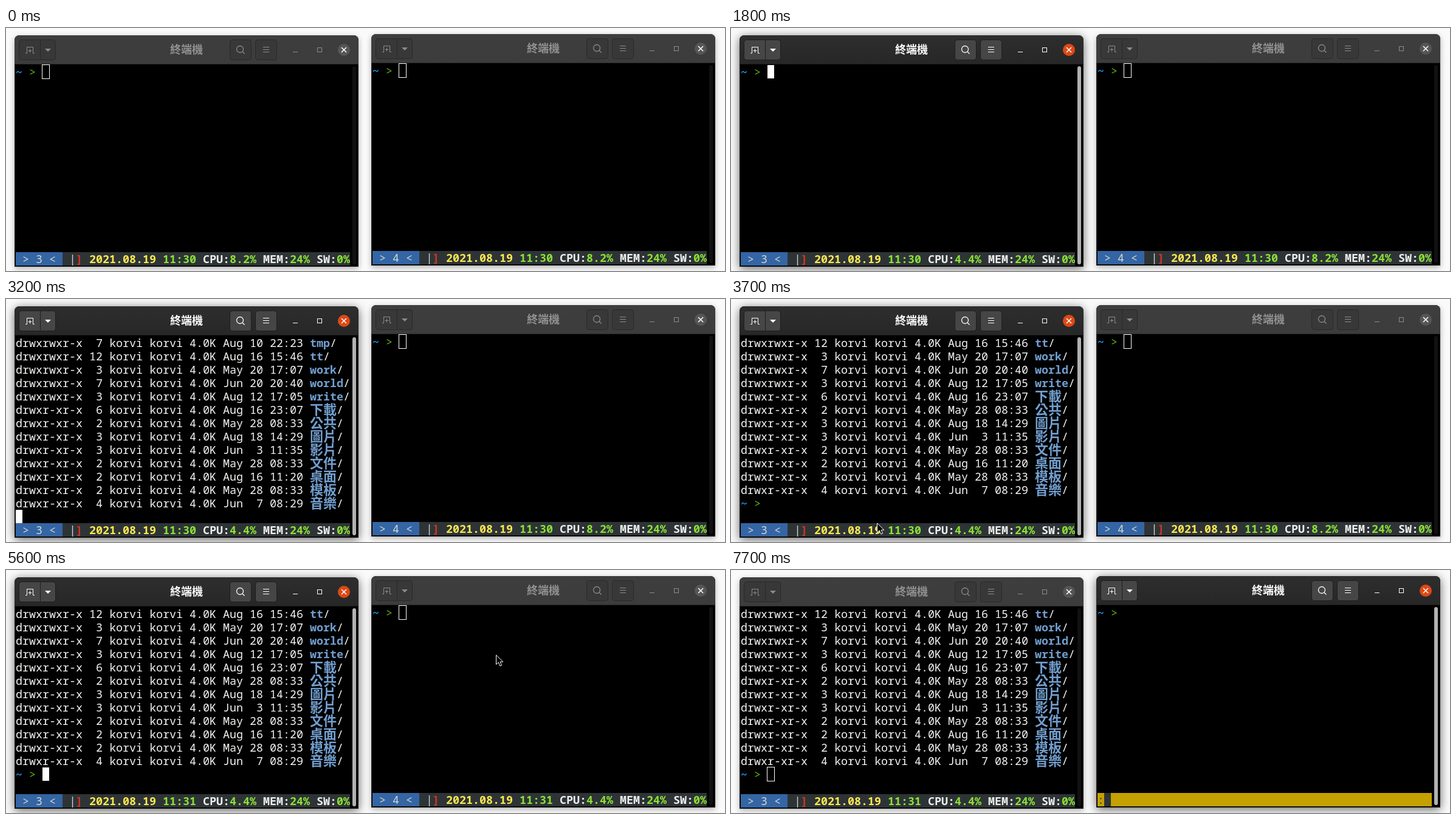
Animation of 1183x400 px, one loop 8000 ms. Source, as an HTML page with a canvas:

```html
<!DOCTYPE html>
<html lang="zh-Hant">
<head>
<meta charset="utf-8">
<title>Terminals</title>
<style>
html, body { margin: 0; width: 100%; height: 100%; overflow: hidden; background: #fafafa; }
canvas { display: block; }
</style>
</head>
<body>
<canvas id="stage" width="1183" height="400"></canvas>
<script>
const ctx = document.getElementById('stage').getContext('2d');
const LOOP = 8000, TICK = 100;
const CW = 11, CH = 22;
const MONO = '18.333px "Noto Sans Mono", "DejaVu Sans Mono", monospace';
const CJK = '"Noto Sans CJK TC", "Noto Sans CJK", "Noto Sans CJK JP", sans-serif';
const C = {
  text: '#f4f4f2', dir: '#729fcf', tilde: '#1e9ff2', arrow: '#5cb811',
  bar: '#2e3436', tab: '#3465a4', soft: '#d3d7cf', red: '#e2321f',
  yellow: '#fce94f', green: '#8ae234', white: '#eeeeec', prompt: '#c4a000'
};

// group bits, links, date, name
const entry = s => {
  const [g, n, date, name] = s.split('|');
  return [`drwx${g}r-x ${n.padStart(2)} korvi korvi 4.0K ${date} `, name];
};
const first = [
  'rwx|2|May 28 09:12|bin', 'rwx|5|Jun 14 10:41|doc', 'rwx|3|Jul  2 16:20|etc',
  'rwx|9|Aug 11 21:03|git', 'rwx|4|Jun 30 13:55|img', 'rwx|6|Jul 19 18:27|lib',
  'rwx|2|May 31 11:08|log', 'rwx|3|Aug  4 20:36|opt', 'rwx|8|Aug  9 22:14|src'
].map(entry);
const last = [
  'rwx|7|Aug 10 22:23|tmp', 'rwx|12|Aug 16 15:46|tt', 'rwx|3|May 20 17:07|work',
  'rwx|7|Jun 20 20:40|world', 'rwx|3|Aug 12 17:05|write', 'r-x|6|Aug 16 23:07|下載',
  'r-x|2|May 28 08:33|公共', 'r-x|3|Aug 18 14:29|圖片', 'r-x|3|Jun  3 11:35|影片',
  'r-x|2|May 28 08:33|文件', 'r-x|2|Aug 16 11:20|桌面', 'r-x|2|May 28 08:33|模板',
  'r-x|4|Jun  7 08:29|音樂'
].map(entry);

// pointer steps: time, x, y (no x = hidden)
const pointerSteps = [
  [0], [400, 520, 330], [500, 420, 280], [600, 321, 249], [1500, 221, 252],
  [1700, 262, 370], [1800],
  [3600, 301, 201], [3700, 240, 368], [3800, 180, 245], [4000, 140, 290],
  [4100, 100, 330], [4200, 60, 360], [4300, 30, 374], [4400, 18, 376],
  [4500, 8, 377], [4700, 40, 372], [4800, 80, 370], [4900, 112, 372],
  [5100, 80, 362], [5200, 23, 370], [5300, 50, 378],
  [5500, 480, 250], [5600, 806, 139], [5700, 806, 138], [7100]
];

const within = (t, a, b) => t >= a && t < b;
const lerp = (a, b, f) => a + (b - a) * f;
const rgb = (a, b, f) => `rgb(${a.map((v, i) => Math.round(lerp(v, b[i], f)))})`;
const gray = (a, b, f) => rgb([a, a, a], [b, b, b], f);
const rise = (t, start) => t < start ? 0 : [0.4, 0.8, 1][Math.min(2, (t - start) / TICK)];

function box(x, y, w, h, fill) {
  ctx.fillStyle = fill;
  ctx.fillRect(x, y, w, h);
}

function round(x, y, w, h, r, fill, stroke) {
  ctx.beginPath();
  ctx.roundRect(x, y, w, h, r);
  if (fill) { ctx.fillStyle = fill; ctx.fill(); }
  if (stroke) { ctx.strokeStyle = stroke; ctx.stroke(); }
}

function line(...pts) {
  ctx.beginPath();
  for (let i = 0; i < pts.length; i += 2) ctx.lineTo(pts[i], pts[i + 1]);
  ctx.stroke();
}

// Writes on the character grid and returns the next column.
function write(col, row, str, color, bold) {
  ctx.fillStyle = color;
  ctx.textAlign = 'left';
  for (const ch of str) {
    const wide = ch > '\u2e80';
    ctx.font = (bold ? 'bold ' : '') + (wide ? '22px ' + CJK : MONO);
    if (ch !== ' ') ctx.fillText(ch, 16 + col * CW, 61 + row * CH + (wide ? 19 : 18));
    col += wide ? 2 : 1;
  }
  return col;
}

function prompt(row, cmd = '') {
  write(0, row, '~', C.tilde, true);
  write(2, row, '>', C.arrow);
  write(4, row, cmd, C.text);
}

function list(rows, top) {
  rows.forEach(([info, name], i) => {
    write(0, top + i, info, C.text);
    write(write(44, top + i, name, C.dir, true), top + i, '/', C.text);
  });
}

function cursor(col, row, focused, lit) {
  const x = 16 + col * CW, y = 61 + row * CH;
  if (!focused) {
    ctx.strokeStyle = '#fff';
    ctx.strokeRect(x - 0.5, y - 0.5, 12, 23);
  } else if (lit) box(x, y, CW, CH, '#fff');
}

function statusBar(tab, clock, cpu) {
  box(16, 369, 50 * CW, CH, C.bar);
  box(16, 369, 7 * CW, CH, C.tab);
  write(1, 14, `> ${tab} <`, C.soft);
  write(8, 14, '|', C.soft);
  if (cpu.length < 5) write(9, 14, ']', C.red, true);
  let col = 15 - cpu.length;
  const parts = [
    ['2021.08.19 ', C.yellow], [clock + ' ', C.green], ['CPU:', C.white], [cpu + ' ', C.green],
    ['MEM:', C.white], ['24% ', C.green], ['SW:', C.white], ['0%', C.green]
  ];
  for (const [s, color] of parts) col = write(col, 14, s, color, true);
}

function commandBar() {
  box(16, 369, 50 * CW, CH, C.prompt);
  box(27, 369, CW, CH, C.bar);
  write(0, 14, ':', C.bar);
}

function header(f) {
  const icon = gray(140, 255, f), fill = gray(56, 70, f), edge = gray(41, 30, f);
  const grad = ctx.createLinearGradient(0, 12, 0, 59);
  grad.addColorStop(0, gray(62, 46, f));
  grad.addColorStop(1, gray(60, 39, f));
  round(14, 12, 566, 48, [8, 8, 0, 0], grad);
  box(14, 59, 566, 1, gray(38, 24, f));

  round(21.5, 19.5, 60, 33, 4, fill, edge);
  round(368.5, 19.5, 35, 33, 4, fill, edge);
  round(410.5, 19.5, 35, 33, 4, fill, edge);
  line(56.5, 20, 56.5, 52);

  ctx.strokeStyle = ctx.fillStyle = icon;
  line(32, 41.5, 34.5, 41.5, 34.5, 31.5, 44.5, 31.5, 44.5, 41.5, 47, 41.5);
  line(36.5, 37.5, 42.5, 37.5);
  line(39.5, 34.5, 39.5, 40.5);
  ctx.beginPath();
  ctx.moveTo(64, 34); ctx.lineTo(74, 34); ctx.lineTo(69, 39);
  ctx.fill();
  ctx.lineWidth = 1.3;
  ctx.beginPath();
  ctx.arc(385, 35, 5.5, 0, 7);
  ctx.stroke();
  line(389, 39, 392.5, 42.5);
  ctx.lineWidth = 1;
  for (const y of [31.5, 35.5, 39.5]) line(423, y, 433, y);
  line(472, 39.5, 480, 39.5);
  ctx.strokeRect(512.5, 32.5, 7, 7);

  ctx.beginPath();
  ctx.arc(556, 36, 10, 0, 7);
  ctx.fillStyle = rgb([86, 86, 86], [222, 72, 22], f);
  ctx.fill();
  ctx.strokeStyle = '#fff';
  ctx.lineWidth = 1.6;
  line(552, 32, 560, 40);
  line(560, 32, 552, 40);
  ctx.lineWidth = 1;

  ctx.font = 'bold 18px ' + CJK;
  ctx.textAlign = 'center';
  ctx.fillStyle = gray(146, 255, f);
  ctx.fillText('終端機', 297, 42);
}

function terminal(dx, dy, f, content) {
  ctx.save();
  ctx.translate(dx, dy);
  ctx.save();
  ctx.shadowColor = `rgba(0,0,0,${lerp(0.3, 0.6, f)})`;
  ctx.shadowBlur = lerp(10, 16, f);
  ctx.shadowOffsetY = 3;
  round(14, 12, 566, 381, [8, 8, 0, 0], '#1c1c1c');
  ctx.restore();
  box(15, 60, 564, 332, '#000');
  header(f);
  round(570, 63, 6, 326, 3, gray(17, 178, f));
  content();
  ctx.restore();
}

function leftContent(t) {
  const focused = within(t, 600, 5700);
  const lit = !within(t, 1200, 1800) && !within(t, 3700, 4300) && !within(t, 4900, 5500);
  let at = [4, 0];
  if (t < 3000) {
    const cmd = 'ls -lh'.slice(0, Math.max(0, (t - 1800) / TICK));
    prompt(0, cmd);
    at = t < 2900 ? [4 + cmd.length, 0] : [0, 1];
  } else if (t < 3200) {
    prompt(0, 'ls -lh');
    write(0, 1, 'total 148K', C.text);
    list(first, 2);
    at = [0, 11];
  } else if (t < 3300) {
    list(last, 0);
    at = [0, 13];
  } else {
    list(last.slice(1), 0);
    prompt(12);
    at = [4, 12];
  }
  cursor(...at, focused, lit);
  statusBar(3, t < 4100 ? '11:30' : '11:31', t < 600 ? '8.2%' : '4.4%');
}

function rightContent(t) {
  prompt(0);
  cursor(4, 0, t >= 5700, !within(t, 6300, 6900) && t < 7700);
  if (t >= 7700) return commandBar();
  statusBar(4, t < 4100 ? '11:30' : '11:31', t < 4100 ? '8.2%' : t < 6000 ? '4.4%' : '11.4%');
}

function shape(x, y, pts) {
  ctx.beginPath();
  for (let i = 0; i < pts.length; i += 2) ctx.lineTo(x + pts[i], y + pts[i + 1]);
  ctx.closePath();
  ctx.fillStyle = '#000';
  ctx.strokeStyle = '#fff';
  ctx.fill();
  ctx.stroke();
}

function pointer(t) {
  const [start, x, y] = pointerSteps.findLast(s => s[0] <= t);
  if (x === undefined) return;
  if (start === 4500) {
    for (const d of [-1, 1]) shape(x, y + 0.5, [0, d * 10, 4.5, d * 2.5, -4.5, d * 2.5]);
  } else {
    shape(x + 0.5, y + 1, [0, 0, 0, 15.5, 3.8, 12, 6.3, 18, 9, 17, 6.6, 11.2, 11.3, 11.2]);
  }
}

function draw(t) {
  box(0, 0, 1183, 400, '#fafafa');
  const right = rise(t, 5700);
  terminal(0, 0, rise(t, 600) - right, () => leftContent(t));
  terminal(587, -2, right, () => rightContent(t));
  pointer(t);
}

const begin = performance.now();
let shown = -1;
function loop() {
  const t = Math.floor((performance.now() - begin) % LOOP / TICK) * TICK;
  if (t !== shown) draw(shown = t);
  requestAnimationFrame(loop);
}
loop();
</script>
</body>
</html>
```
